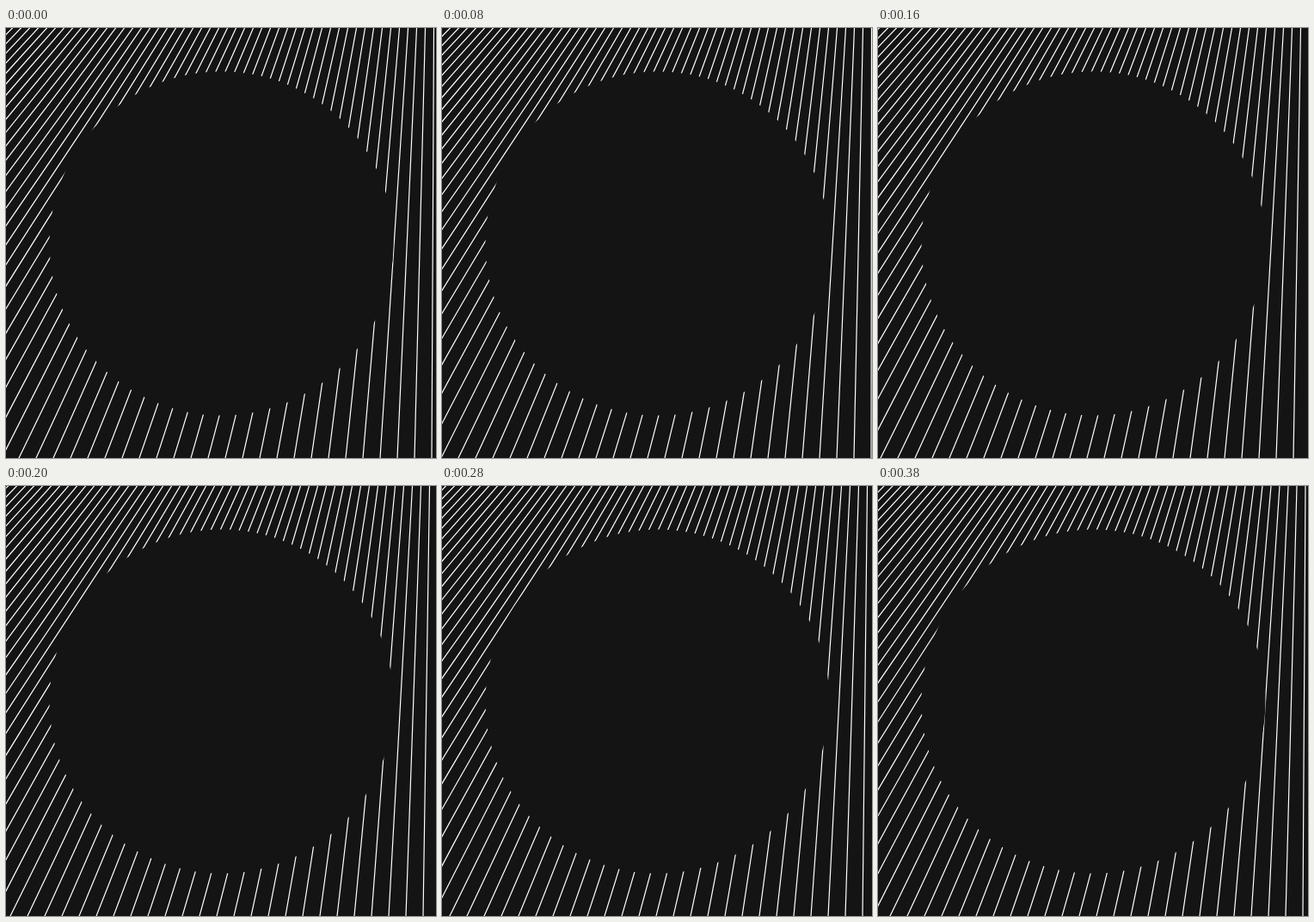
Animation, 500 px wide and 500 px high, one loop 400 ms. Source, as an HTML page with a canvas:

```html
<!DOCTYPE html>
<html lang="en">
<head>
<meta charset="utf-8">
<title>Rays around a disc</title>
<style>
  html, body { margin: 0; width: 100%; height: 100%; overflow: hidden; background: #141414; }
  canvas { display: block; }
</style>
</head>
<body>
<canvas id="stage" width="500" height="500"></canvas>
<script>
  const SIZE = 500, LOOP = 400, STEP = 20, GAP = 20, RAYS = 56;
  const INK = '#fff', GROUND = '#141414';
  const APEX = { x: 500, y: -500 };
  const DISC = { x: 250.5, y: 250.5, r: 200 };
  const ctx = document.getElementById('stage').getContext('2d');

  // Rays fan out from a fixed apex; their feet slide right by one gap per loop.
  function draw(time) {
    const step = Math.floor((time % LOOP) / STEP + 1e-6);
    const first = 495 + GAP * step * STEP / LOOP;

    ctx.fillStyle = GROUND;
    ctx.fillRect(0, 0, SIZE, SIZE);

    ctx.strokeStyle = INK;
    ctx.lineWidth = 1.2;
    ctx.beginPath();
    for (let i = 0; i < RAYS; i++) {
      const foot = first - i * GAP;
      ctx.moveTo(APEX.x, APEX.y);
      ctx.lineTo(APEX.x + (foot - APEX.x) * 1.02, APEX.y + (SIZE - APEX.y) * 1.02);
    }
    ctx.stroke();

    ctx.fillStyle = GROUND;
    ctx.beginPath();
    ctx.arc(DISC.x, DISC.y, DISC.r, 0, Math.PI * 2);
    ctx.fill();
  }

  let start;
  function tick(now) {
    if (start === undefined) start = now;
    draw(now - start);
    requestAnimationFrame(tick);
  }
  draw(0);
  requestAnimationFrame(tick);
</script>
</body>
</html>
```
